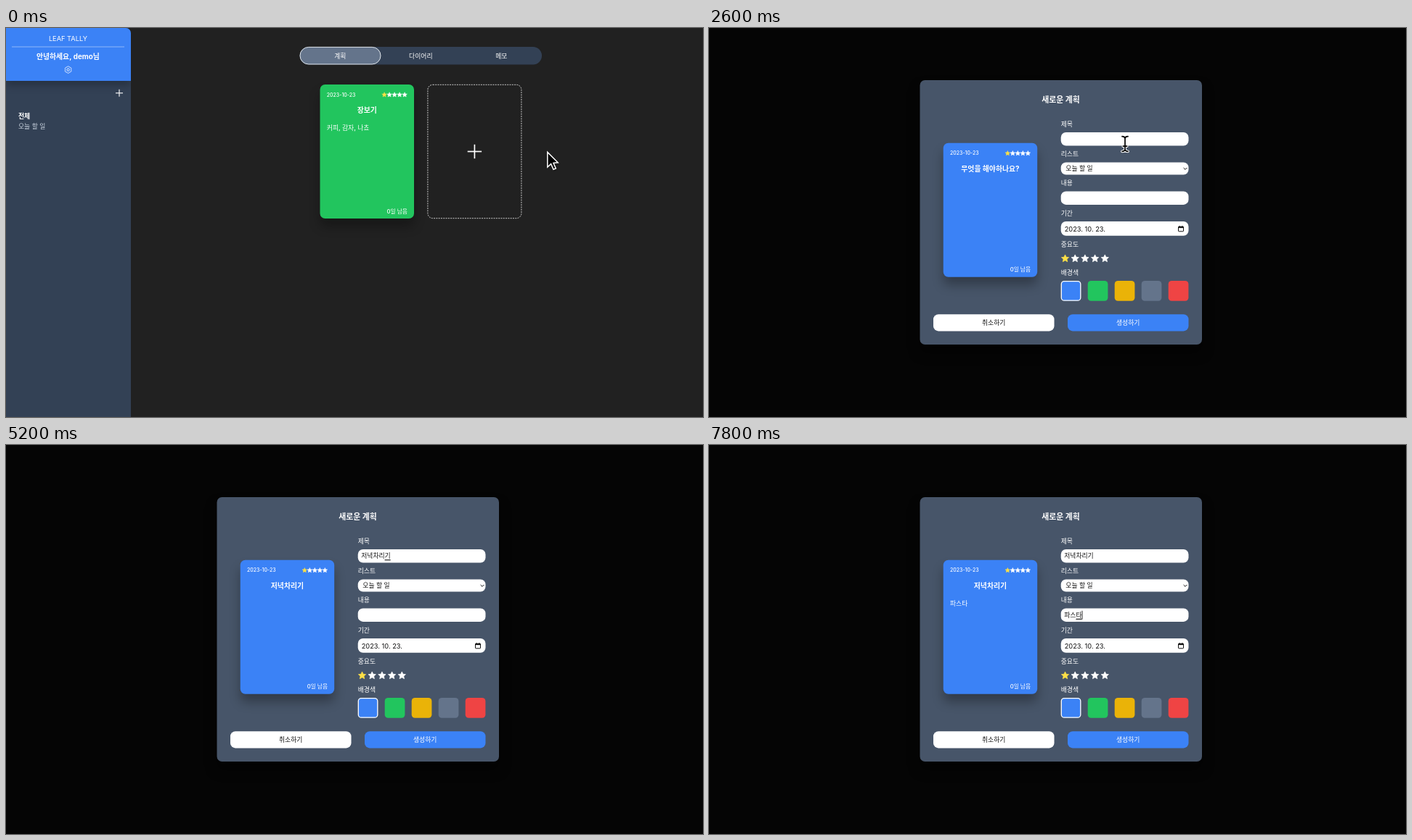
Recreate the animation shown at these times as an HTML page with a canvas. Size 960 px wide and 537 px high, loop 8 s.

```html
<!DOCTYPE html>
<html lang="ko">
<head>
<meta charset="utf-8">
<title>Card planner</title>
<style>
html, body { margin: 0; width: 100%; height: 100%; overflow: hidden; background: #212121; }
canvas { display: block; width: 960px; height: 537px; }
</style>
</head>
<body>
<canvas id="stage"></canvas>
<script>
const W = 960, H = 537, LOOP = 8000;
const canvas = document.getElementById('stage');
const ctx = canvas.getContext('2d');
const dpr = window.devicePixelRatio || 1;
canvas.width = W * dpr;
canvas.height = H * dpr;

const FONT = "Inter, 'Noto Sans CJK KR', 'Noto Sans CJK JP', sans-serif";
const BLUE = '#3b82f6', GREEN = '#22c55e', SLATE = '#334155', GREY = '#64748b';
const YELLOW = '#fde047', WHITE = '#fff', INK = '#111';
const BODY = 8.8, HEAD = 9.85;

const clamp = v => Math.max(0, Math.min(1, v));
const ease = v => v * v * (3 - 2 * v);
const mix = (a, b, p) => a + (b - a) * p;
const within = (t, ranges) => ranges.some(([a, b]) => t >= a && t < b);

// Each entry is the value shown from that time on.
const TITLE = [[0, ''], [3300, 'ㅈ'], [3400, '저'], [3600, '전'], [3700, '저녀'], [3800, '저녁'],
  [4100, '저녁ㅊ'], [4200, '저녁차'], [4300, '저녁찰'], [4400, '저녁차리'], [4500, '저녁차릭'],
  [4700, '저녁차리기']];
const CONTENT = [[0, ''], [7300, 'ㅍ'], [7400, '파'], [7500, '팟'], [7600, '파스'], [7800, '파스타']];
const valueAt = (steps, t) => steps.filter(s => s[0] <= t).pop()[1];

function setFont(size, weight) {
  ctx.font = `${weight} ${size}px ${FONT}`;
}

// y is the visual middle of the line
function text(s, x, y, size = BODY, { color = WHITE, weight = 500, align = 'left' } = {}) {
  setFont(size, weight);
  ctx.fillStyle = color;
  ctx.textAlign = align;
  ctx.fillText(s, x, y + size * 0.37);
}

function box(x, y, w, h, r, fill, stroke, line = 1) {
  ctx.beginPath();
  ctx.roundRect(x, y, w, h, r);
  if (fill) { ctx.fillStyle = fill; ctx.fill(); }
  if (stroke) { ctx.strokeStyle = stroke; ctx.lineWidth = line; ctx.stroke(); }
}

function shadowed(blur, dy, alpha, draw) {
  ctx.save();
  ctx.shadowColor = `rgba(0,0,0,${alpha})`;
  ctx.shadowBlur = blur * dpr;
  ctx.shadowOffsetY = dy * dpr;
  draw();
  ctx.restore();
}

function path(points, close) {
  ctx.beginPath();
  points.forEach(([x, y], i) => i ? ctx.lineTo(x, y) : ctx.moveTo(x, y));
  if (close) ctx.closePath();
}

function strokePath(points, color, width) {
  path(points);
  ctx.strokeStyle = color;
  ctx.lineWidth = width;
  ctx.stroke();
}

function plus(x, y, r, width) {
  strokePath([[x - r, y], [x + r, y]], WHITE, width);
  strokePath([[x, y - r], [x, y + r]], WHITE, width);
}

function stars(x, y, step, r) {
  for (let n = 0; n < 5; n++) {
    const points = [];
    for (let i = 0; i < 10; i++) {
      const a = -Math.PI / 2 + i * Math.PI / 5, d = i % 2 ? r * 0.47 : r;
      points.push([x + n * step + d * Math.cos(a), y + r * 0.06 + d * Math.sin(a)]);
    }
    path(points, true);
    ctx.lineJoin = 'round';
    ctx.fillStyle = ctx.strokeStyle = n ? WHITE : YELLOW;
    ctx.lineWidth = r * 0.14;
    ctx.fill();
    ctx.stroke();
  }
}

function gear(x, y) {
  ctx.beginPath();
  for (let i = 0; i <= 72; i++) {
    const a = i / 72 * Math.PI * 2;
    const r = 4.1 + 0.55 * clamp(Math.cos(a * 6 + Math.PI) * 2 + 0.5);
    ctx.lineTo(x + r * Math.cos(a), y + r * Math.sin(a));
  }
  ctx.closePath();
  ctx.strokeStyle = WHITE;
  ctx.lineWidth = 0.9;
  ctx.stroke();
  ctx.beginPath();
  ctx.arc(x, y, 1.7, 0, 7);
  ctx.stroke();
}

function planCard(x, y, color, title, content) {
  shadowed(15, 11, 0.3, () => box(x, y, 129.5, 185, 7, color));
  text('2023-10-23', x + 9.3, y + 14, 6.94);
  stars(x + 88.6, y + 14, 7, 3.5);
  text(title, x + 64.75, y + 35.7, HEAD, { weight: 700, align: 'center' });
  text(content, x + 9.3, y + 60.2);
  text('0일 남음', x + 120.3, y + 174.7, 7.7, { align: 'right' });
}

function sidebar() {
  box(0, 0, 172, H, [0, 7, 0, 0], SLATE);
  ctx.save();
  ctx.beginPath();
  ctx.rect(0, 0, 172, H);
  ctx.clip();
  shadowed(12, 6, 0.25, () => box(0, 0, 172, 73, [0, 7, 0, 0], BLUE));
  ctx.restore();
  text('LEAF TALLY', 85.5, 14.8, 9.25, { weight: 400, align: 'center' });
  strokePath([[8, 26], [163, 26]], 'rgba(255,255,255,.55)', 0.8);
  text('안녕하세요, demo님', 85.4, 39.3, HEAD, { weight: 700, align: 'center' });
  gear(85.6, 57.6);
  plus(156, 89.8, 5, 1.1);
  text('전체', 17, 122, BODY, { weight: 700 });
  text('오늘 할 일', 17, 136, BODY, { weight: 400, color: '#cbd5e1' });
}

function board(t) {
  ctx.fillStyle = '#212121';
  ctx.fillRect(0, 0, W, H);
  sidebar();

  box(404.5, 26, 333.5, 24.5, 12.2, SLATE);
  box(405, 26.4, 111, 23.6, 11.8, GREY, '#f1f5f9', 0.9);
  ['계획', '다이어리', '메모'].forEach((s, i) =>
    text(s, 460.3 + i * 111, 38.3, BODY, { align: 'center' }));

  planCard(432.5, 78, GREEN, '장보기', '커피, 감자, 나쵸');

  const zoom = 1 + 0.05 * clamp((t - 850) / 150);
  ctx.save();
  ctx.translate(645.4, 170.5);
  ctx.scale(zoom, zoom);
  ctx.setLineDash([2, 1.3]);
  box(-64.5, -92.2, 129, 184.4, 7, null, '#e8e8e8', 0.85);
  ctx.setLineDash([]);
  plus(0, 0, 9.7, 1.7);
  ctx.restore();
}

function squiggle(x, y, w) {
  ctx.fillStyle = '#e5484d';
  for (let i = 0; i < w; i += 2) ctx.fillRect(x + i, y, 1.1, 1);
}

function field(value, y, { composing, caret, misspelt }) {
  const x = 489.2;
  text(value, x, y, BODY, { color: INK, weight: 400 });
  const end = x + ctx.measureText(value).width;
  const start = x + ctx.measureText(value.slice(0, -1)).width;
  if (misspelt) squiggle(x, y + 4.9, start - x);
  ctx.fillStyle = INK;
  if (composing && value) ctx.fillRect(start, y + 5, end - start, 1.1);
  if (caret) ctx.fillRect(end, y - 6, 0.9, 12);
}

function calendar(x, y) {
  box(x - 3.5, y - 3, 7, 6.6, 0.7, null, INK, 1);
  ctx.fillStyle = INK;
  ctx.fillRect(x - 3.5, y - 3, 7, 1.9);
  ctx.fillRect(x - 2.4, y - 4.2, 1, 1.5);
  ctx.fillRect(x + 1.4, y - 4.2, 1, 1.5);
}

function dialog(t) {
  ctx.fillStyle = '#050505';
  ctx.fillRect(0, 0, W, H);
  shadowed(15, 11, 0.5, () => box(290.5, 72, 388.5, 365, 7, '#475569'));
  text('새로운 계획', 484.5, 99, 10.9, { weight: 700, align: 'center' });

  const title = valueAt(TITLE, t), content = valueAt(CONTENT, t);
  planCard(322.7, 158.8, BLUE, title || '무엇을 해야하나요?', content);

  [['제목', 132.3], ['리스트', 174], ['내용', 214], ['기간', 255.5], ['중요도', 298.3], ['배경색', 337.8]]
    .forEach(([s, y]) => text(s, 484.7, y));
  [[144, 18.5], [185.5, 17], [225.4, 18.5], [267, 19.8]]
    .forEach(([y, h]) => box(484.7, y, 175.8, h, 7, WHITE));

  field(title, 153.2, {
    composing: t < 6300,
    caret: within(t, [[2100, 2600], [3100, 5200], [5700, 6200]]),
    misspelt: within(t, [[5700, 6300]])
  });
  text('오늘 할 일', 491.3, 194.2, BODY, { color: INK, weight: 400 });
  strokePath([[653.6, 193], [656, 195.4], [658.4, 193]], INK, 1);
  field(content, 234.8, {
    composing: true,
    caret: within(t, [[6300, 6800], [7300, LOOP]])
  });
  text('2023. 10. 23.', 489.7, 277.2, 9.25, { color: INK, weight: 400 });
  calendar(650, 277.2);

  stars(490.5, 318, 13.7, 5.4);
  [BLUE, GREEN, '#eab308', GREY, '#ef4444'].forEach((c, i) => {
    const x = 484.7 + i * 37;
    if (i) box(x, 349, 27.7, 27.8, 4.5, c);
    else box(x + 0.6, 349.6, 26.5, 26.6, 4, c, WHITE, 1.3);
  });

  box(309, 395.2, 166.5, 23.2, 7, WHITE);
  box(494, 395.2, 166.5, 23.2, 7, BLUE);
  text('취소하기', 392.2, 407, BODY, { color: INK, align: 'center' });
  text('생성하기', 577.2, 407, BODY, { align: 'center' });
}

function arrow(x, y) {
  ctx.save();
  ctx.translate(x, y);
  path([[0.8, 1.4], [0.8, 22], [5.6, 17.6], [9, 25.3], [12.3, 23.8], [9, 16.3], [15.2, 15.8]], true);
  ctx.lineJoin = 'miter';
  shadowed(3, 1.5, 0.4, () => { ctx.fillStyle = '#000'; ctx.fill(); });
  ctx.strokeStyle = WHITE;
  ctx.lineWidth = 1.5;
  ctx.stroke();
  ctx.restore();
}

function beam(x, y) {
  ctx.save();
  ctx.translate(x, y);
  ctx.lineCap = 'round';
  ctx.beginPath();
  for (const s of [-1, 1]) {
    ctx.moveTo(-4, s * 10.3);
    ctx.quadraticCurveTo(-0.5, s * 10.3, 0, s * 7.6);
    ctx.quadraticCurveTo(0.5, s * 10.3, 4, s * 10.3);
  }
  ctx.moveTo(0, -8);
  ctx.lineTo(0, 8);
  ctx.moveTo(-2.6, 3.2);
  ctx.lineTo(2.6, 3.2);
  for (const [color, width] of [[WHITE, 3.8], ['#000', 1.7]]) {
    ctx.strokeStyle = color;
    ctx.lineWidth = width;
    ctx.stroke();
  }
  ctx.restore();
}

// [start, end, from x, from y, to x, to y]
const MOVES = [
  [600, 1200, 745, 170, 656, 188],
  [1600, 2100, 656, 188, 573, 160],
  [5600, 6000, 573, 160, 533, 248.5]
];

function cursor(t) {
  // the pointer hides while typing
  if (within(t, [[3300, 5700], [7300, LOOP]])) return;
  const [a, b, x0, y0, x1, y1] = MOVES.filter(m => m[0] <= t).pop() || MOVES[0];
  const p = ease(clamp((t - a) / (b - a)));
  const x = mix(x0, x1, p), y = mix(y0, y1, p);
  const overInput = t >= 1300 && within(y, [[144, 162.5], [225, 250]]);
  (overInput ? beam : arrow)(x, y);
}

function frame(now) {
  const t = Math.floor(now % LOOP / 100) * 100;
  ctx.setTransform(dpr, 0, 0, dpr, 0, 0);
  if (t < 1300) board(t);
  else dialog(t);
  cursor(t);
  requestAnimationFrame(frame);
}
requestAnimationFrame(frame);
</script>
</body>
</html>
```
